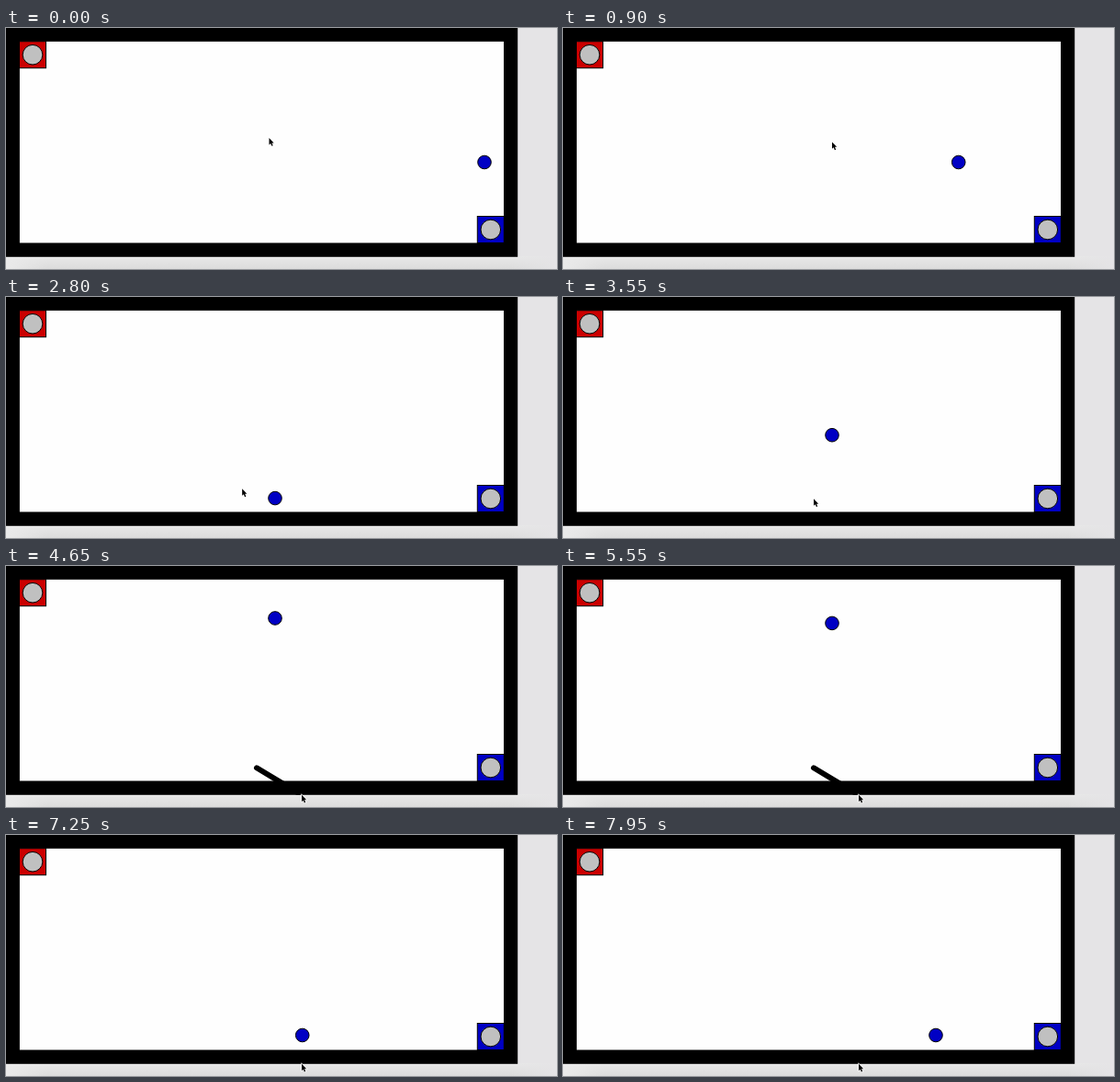
Recreate the animation shown at these times as an HTML page with a canvas. Size 600x263 px, loop 8 s.

```html
<!DOCTYPE html>
<html lang="en">
<head>
<meta charset="utf-8">
<title>Ball and drawn walls</title>
<style>
  html, body { margin: 0; width: 100%; height: 100%; overflow: hidden; background: #e5e4e6; }
  canvas { display: block; width: 600px; height: 263px; }
</style>
</head>
<body>
<canvas id="stage" width="600" height="263"></canvas>
<script>
const ctx = document.getElementById('stage').getContext('2d');
const LOOP = 8000, STEP = 50;
const RED = '#cb0000', BLUE = '#0000c4', SILVER = '#c0c0c0';
const FRAME_RIGHT = 557.2, FRAME_BOTTOM = 249.8;

// Each move goes on from where the previous one ended; power > 1 gathers speed
const ball = {
  x: 521, y: 146.5,
  moves: [
    { from: 0, to: 2140, x: 293, power: 1.07 },
    { from: 2140, to: 2840, y: 224 },
    { from: 2840, to: 3550, y: 150.7 },
    { from: 3550, to: 5100, y: 14, power: 1.1 },
    { from: 5100, to: 7000, y: 218.5 },
    { from: 7000, to: 7950, x: 406 }
  ]
};
const drawFirst = { from: 1100, to: 2150, x: 240, y: 197.5 };
const drawSecond = { from: 3600, to: 4200, x: 322, y: 249.8 };
const cursor = {
  x: 286.5, y: 120,
  moves: [
    { from: 0, to: 900, x: 293, y: 124.4 },
    drawFirst,
    { from: 2150, to: 3400, x: 273, y: 220.3 },
    drawSecond
  ]
};

function positionAt({ x, y, moves }, t) {
  for (const move of moves) {
    if (t < move.from) break;
    const progress = Math.min(1, (t - move.from) / (move.to - move.from));
    const k = progress ** (move.power ?? 1);
    x += ((move.x ?? x) - x) * k;
    y += ((move.y ?? y) - y) * k;
  }
  return [x, y];
}

function rect(color, x, y, w, h) {
  ctx.fillStyle = color;
  ctx.fillRect(x, y, w, h);
}

function gradientRect(x, y, w, h, vertical, ...colors) {
  const gradient = ctx.createLinearGradient(x, y, vertical ? x : x + w, vertical ? y + h : y);
  colors.forEach((color, i) => gradient.addColorStop(i, color));
  rect(gradient, x, y, w, h);
}

function disc(color, x, y, r) {
  ctx.beginPath();
  ctx.arc(x, y, r, 0, Math.PI * 2);
  ctx.fillStyle = color;
  ctx.fill();
  ctx.strokeStyle = '#000';
  ctx.lineWidth = 1;
  ctx.stroke();
}

function base(color, cx, cy) {
  rect(color, cx - 14.5, cy - 14.5, 29, 29);
  ctx.strokeStyle = '#000';
  ctx.lineWidth = 1;
  ctx.strokeRect(cx - 14.5, cy - 14.5, 29, 29);
  disc(SILVER, cx, cy, 10.8);
}

function drawBackground() {
  rect('#e5e4e6', 0, 0, 600, 263);
  gradientRect(0, 249, 600, 14, true, '#e8e8e8', '#dcdcdc');
  gradientRect(0, 249, 45, 14, false, '#eaeaea', 'rgba(234,234,234,0)');
  gradientRect(550, 249, 50, 14, false, 'rgba(229,228,230,0)', '#e5e4e6');
}

// A wall is the trail of the cursor, one step behind, until the ball hits it
function drawWall(stroke, hitTime, width, t) {
  const tip = Math.min(t, stroke.to) - STEP;
  if (tip < stroke.from || t >= hitTime) return;
  ctx.beginPath();
  ctx.moveTo(...positionAt(cursor, stroke.from));
  ctx.lineTo(...positionAt(cursor, tip));
  ctx.strokeStyle = '#000';
  ctx.lineWidth = width;
  ctx.lineCap = 'round';
  ctx.stroke();
}

function drawCursor(x, y) {
  ctx.save();
  ctx.translate(x, y);
  const arrow = new Path2D('M0 0V7.4L1.7 5.9L2.9 8.8L4.2 8.3L3 5.4H5.2Z');
  ctx.strokeStyle = '#fff';
  ctx.lineWidth = 1.2;
  ctx.stroke(arrow);
  ctx.fillStyle = '#000';
  ctx.fill(arrow);
  ctx.restore();
}

function draw(t) {
  drawBackground();
  rect('#000', 0, 0, FRAME_RIGHT, FRAME_BOTTOM);
  rect('#fefefe', 14.9, 14.8, 527.1, 219.7);

  ctx.save();
  ctx.beginPath();
  ctx.rect(0, 0, FRAME_RIGHT, FRAME_BOTTOM);
  ctx.clip();
  drawWall(drawFirst, 2150, 7.5, t);
  drawWall(drawSecond, 7000, 6, t);
  ctx.restore();

  base(RED, 29, 29.2);
  base(BLUE, 527.8, 220);
  disc(BLUE, ...positionAt(ball, t), 7.3);
  drawCursor(...positionAt(cursor, t));
}

const start = performance.now();
function tick() {
  const t = (performance.now() - start) % LOOP;
  draw(Math.floor(t / STEP) * STEP);
  requestAnimationFrame(tick);
}
tick();
</script>
</body>
</html>
```
